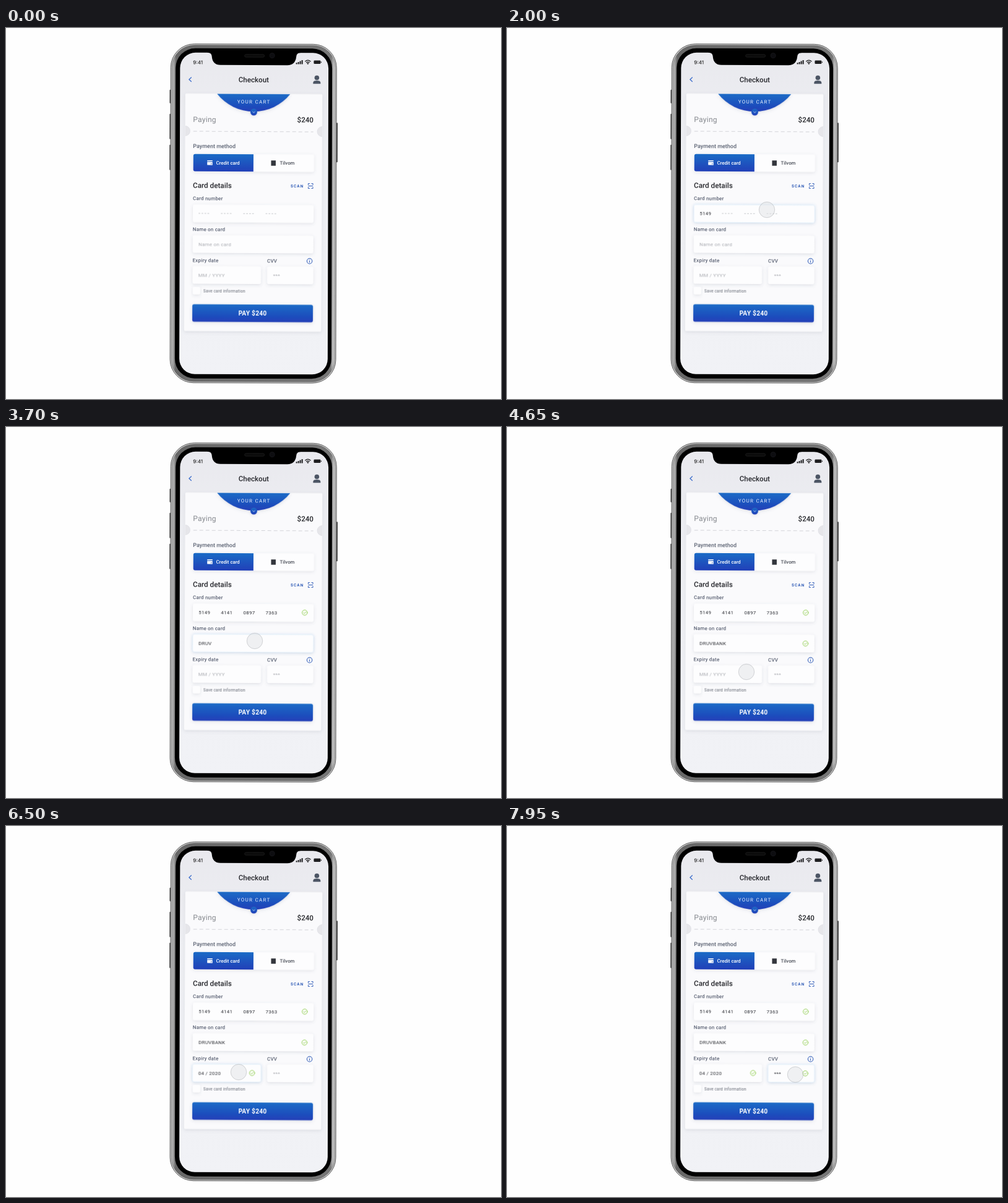
An HTML page for the animation above (8000 ms loop, 800 px wide and 600 px high).

```html
<!DOCTYPE html>
<html lang="en">
<head>
<meta charset="utf-8">
<title>Checkout</title>
<style>
  html, body { margin: 0; width: 100%; height: 100%; overflow: hidden; background: #fefefe; }
  svg { display: block; width: 800px; height: 600px; }
  text { font-family: Roboto, sans-serif; white-space: pre; }
  .label { font-size: 8px; font-weight: 500; letter-spacing: .2px; fill: #596072; }
  .value { font-size: 8px; letter-spacing: .25px; fill: #303238; }
  .hint { font-size: 8px; letter-spacing: .25px; fill: #a9abb1; }
  .tab { font-size: 7.8px; font-weight: 500; }
  .box { fill: #fdfdfe; filter: url(#soft); }
  .glow { fill: #fdfdfe; stroke: #e0eefa; stroke-width: .6; filter: url(#blueGlow); }
  .line { fill: none; stroke-width: 1; stroke-linecap: round; stroke-linejoin: round; }
  .blue { stroke: #2a57b5; }
  .ok { stroke: #94cf55; }
  .bad { stroke: #bd4a2c; }
</style>
</head>
<body>
<svg viewBox="0 0 800 600">
  <defs>
    <linearGradient id="blue" x2="0" y2="1">
      <stop stop-color="#1a6bc6"/><stop offset="1" stop-color="#213fb8"/>
    </linearGradient>
    <linearGradient id="screenFill" x2="0" y2="1">
      <stop stop-color="#e9e9ee"/><stop offset=".3" stop-color="#eeeff3"/><stop offset="1" stop-color="#f1f2f6"/>
    </linearGradient>
    <linearGradient id="metal" x2="1" y2="0">
      <stop stop-color="#bcbcbc"/><stop offset=".012" stop-color="#a2a2a2"/><stop offset=".025" stop-color="#676767"/>
      <stop offset=".975" stop-color="#777"/><stop offset=".988" stop-color="#b4b4b4"/><stop offset="1" stop-color="#cfcfcf"/>
    </linearGradient>
    <filter id="soft" x="-20%" y="-50%" width="140%" height="200%">
      <feDropShadow dx="0" dy="1.5" stdDeviation="2.5" flood-color="#5a6078" flood-opacity=".17"/>
    </filter>
    <filter id="blueGlow" x="-20%" y="-50%" width="140%" height="200%">
      <feDropShadow dx="0" dy="0" stdDeviation="2.2" flood-color="#6db8f5" flood-opacity=".25"/>
    </filter>
    <clipPath id="cardClip"><rect x="289" y="106.5" width="221.5" height="384" rx="2"/></clipPath>
    <g id="check"><circle r="4.2"/><path d="M-1.9 .1-.5 1.5 2-1.2"/></g>
  </defs>

  <g transform="rotate(.15 400 300)">
    <!-- phone -->
    <g fill="#3c3c3c">
      <rect x="264" y="100" width="3" height="22" rx="1"/>
      <rect x="264" y="139" width="3" height="41" rx="1"/>
      <rect x="264" y="189" width="3" height="41" rx="1"/>
      <rect x="533" y="153" width="2.6" height="64" rx="1"/>
    </g>
    <rect x="265.7" y="26" width="267.9" height="548" rx="38" fill="#cdcdcd" stroke="#4b4b4b" stroke-width=".9"/>
    <rect x="267.8" y="28" width="263.8" height="544" rx="36" fill="url(#metal)" stroke="#555" stroke-width=".6"/>
    <rect x="273.5" y="33" width="253" height="534" rx="32"/>
    <rect x="280.7" y="40" width="239.8" height="520" rx="25" fill="url(#screenFill)"/>
    <path d="M325 39H475V40Q469 40 468.5 46Q467 60 454 60H346Q333 60 332 46Q331.5 40 325 40Z"/>
    <rect x="385" y="42.7" width="32" height="4.5" rx="2.2" fill="#0b0b0b" stroke="#222" stroke-width=".7"/>
    <circle cx="429.5" cy="44.5" r="4" fill="#0d0d10" stroke="#1c1c20" stroke-width=".7"/>

    <!-- status bar and header -->
    <text x="301.6" y="58.8" font-size="8" font-weight="500" fill="#222" style="font-family: Inter, sans-serif">9:41</text>
    <g fill="#1d1d1f">
      <path d="M468 56h2v2.3h-2zM471 54.8h2v3.5h-2zM474 53.3h2v5h-2zM477 51.8h2v6.5h-2z"/>
      <rect x="496.8" y="52.2" width="11" height="5.6" rx="1.4"/>
      <rect x="508.4" y="54" width="1" height="2" rx=".5"/>
      <circle cx="487.2" cy="57.3" r="1.2"/>
    </g>
    <path class="line" stroke="#1d1d1f" style="stroke-width:1.3" d="M483 53.7Q487.200 50 491.400 53.700M484.800 55.700Q487.200 53.700 489.600 55.700"/>
    <path class="line" stroke="#3f70cc" style="stroke-width:1.3" d="M298.800 80.200 295.300 83.500 298.800 86.800"/>
    <text x="399.800" y="87.700" text-anchor="middle" font-size="11.600" font-weight="500" fill="#25262b">Checkout</text>
    <g fill="#4d5665">
      <circle cx="501.800" cy="80.300" r="3.800"/>
      <path d="M495.800 90V88.200Q495.800 84.800 501.800 84.800T507.800 88.200V90Z"/>
    </g>
  </g>

  <g transform="rotate(.3 400 300)">
    <!-- card -->
    <rect x="288.800" y="106.500" width="221.500" height="384" rx="2" fill="#fafafc" filter="url(#soft)"/>
    <g clip-path="url(#cardClip)">
      <path d="M340 106.500A75.500 75.500 0 0 0 458.500 106.500Z" fill="url(#blue)" filter="url(#soft)"/>
      <circle cx="288.800" cy="167" r="8" fill="#e6e6ea" stroke="#dcdde2" stroke-width=".7"/>
      <circle cx="510.300" cy="167" r="8" fill="#e6e6ea" stroke="#dcdde2" stroke-width=".7"/>
    </g>
    <circle cx="399.600" cy="136" r="5.500" fill="url(#blue)" filter="url(#soft)"/>
    <path class="line" stroke="#cfe2ff" style="stroke-width:.9" d="M397.900 135.400 399.600 137 401.300 135.400"/>
    <text x="399.700" y="122.200" text-anchor="middle" font-size="8" letter-spacing="1.300" fill="#eaf1ff">YOUR CART</text>
    <text x="301.600" y="152.500" font-size="12" letter-spacing=".25" fill="#85888e">Paying</text>
    <text x="496.200" y="152.200" text-anchor="end" font-size="11.600" font-weight="500" fill="#25262b">$240</text>
    <path d="M302 167.500H496" stroke="#d3d4d9" stroke-dasharray="6 4"/>

    <text x="301.800" y="194.500" font-size="9" font-weight="500" fill="#5b6272">Payment method</text>
    <rect class="box" x="302.300" y="204.300" width="195" height="28" rx="3"/>
    <path d="M399.500 204.300V232.300H305.300a3 3 0 0 1-3-3V207.300a3 3 0 0 1 3-3Z" fill="url(#blue)"/>
    <path d="M324.800 214.300h8.500v1.600h-8.500zM324.800 217h8.500v5h-8.500z" fill="#fff"/>
    <path d="M330.300 220.200h2" stroke="#2557bd"/>
    <text class="tab" x="339.100" y="221.200" fill="#fff">Credit card</text>
    <rect x="428" y="214" width="7.500" height="8.500" fill="#33363d"/>
    <text class="tab" x="442.200" y="220.700" fill="#494d57">Tilvom</text>

    <text x="301.900" y="259" font-size="11.700" font-weight="500" fill="#25262b">Card details</text>
    <text x="459.700" y="257.500" font-size="6.300" font-weight="700" letter-spacing="1.200" fill="#2a57b5">SCAN</text>
    <path class="line blue" d="M488.200 253V251.200H490.500M493.500 251.200H495.800V253M488.200 257V258.800H490.500M493.500 258.800H495.800V257M488.500 255H495.500"/>

    <text class="label" x="302" y="278.800">Card number</text>
    <text class="label" x="302" y="328.800">Name on card</text>
    <text class="label" x="302" y="379">Expiry date</text>
    <text class="label" x="422.400" y="379.300">CVV</text>
    <g class="line blue" transform="translate(491 376.500)"><circle r="4.200"/><path d="M0-.2V2M0-2V-1.900"/></g>

    <g id="fields"></g>

    <rect class="box" x="302.500" y="419.300" width="12" height="12" rx="2"/>
    <text x="319.600" y="428.200" font-size="6.700" letter-spacing=".12" fill="#666b76">Save card information</text>
    <rect x="301.900" y="447.200" width="195" height="28.300" rx="3" fill="url(#blue)" filter="url(#soft)"/>
    <text x="399.400" y="465" text-anchor="middle" font-size="10" font-weight="700" letter-spacing=".35" fill="#fff">PAY $240</text>
  </g>

  <circle id="touch" r="12.700" fill="#e2e3e6" fill-opacity=".5" stroke="#8f9299" stroke-opacity=".45" stroke-width=".8"/>
</svg>

<script>
const LOOP = 8000;
const fields = document.getElementById('fields');
const timing = { duration: LOOP, iterations: Infinity };

function add(parent, tag, attrs = {}, content = '') {
  const el = document.createElementNS('http://www.w3.org/2000/svg', tag);
  for (const key in attrs) el.setAttribute(key, attrs[key]);
  el.textContent = content;
  parent.append(el);
  return el;
}

// Visible from one time to another, with a short fade at each end.
function show(el, from, to = LOOP, fade = 100, prop = 'opacity') {
  const steps = from ? [[0, 0], [from, 0], [from + fade, 1]] : [[0, 1]];
  steps.push(...(to < LOOP ? [[to, 1], [to + fade, 0], [LOOP, 0]] : [[LOOP, 1]]));
  el.animate(steps.map(([t, v]) => ({ offset: t / LOOP, [prop]: v })), timing);
}

// Types text one character at a time; `lifetimes` cuts single characters short.
function type(x, y, text, start, pace, lifetimes = {}) {
  const line = add(fields, 'text', { x, y, class: 'value' });
  [...text].forEach((char, i) =>
    show(add(line, 'tspan', {}, char), start + i * pace, lifetimes[i], 0, 'fillOpacity'));
}

function field(x, y, width, focusFrom, focusTo) {
  const box = { x, y, width, height: 28.3, rx: 3 };
  add(fields, 'rect', { ...box, class: 'box' });
  show(add(fields, 'rect', { ...box, class: 'glow' }), focusFrom, focusTo);
}

function hint(x, y, text, until) {
  show(add(fields, 'text', { x, y, class: 'hint' }, text), 0, until, 0);
}

function check(x, y, from) {
  const at = { class: 'line ok', transform: `translate(${x} ${y})`, href: '#check' };
  show(add(fields, 'use', at), from);
}

field(302.1, 286.2, 195, 1750, 3150);
const groups = ['5149', '4141', '0897', '7363'];
groups.forEach((digits, i) => {
  const x = 311.2 + i * 36.1;
  const dashes = { d: `M${x} 300.2h17.5`, stroke: '#b9bbc1', 'stroke-width': .8, 'stroke-dasharray': '2.8 2' };
  show(add(fields, 'path', dashes), 0, 1850 + i * 160, 0);
  type(x, 303, digits, 1850 + i * 160, 40);
});
check(482.8, 299.8, 2520);

field(302, 335.7, 195, 3200, 4400);
hint(311.2, 352.6, 'Name on card', 3400);
type(311.2, 352.6, 'DRUVBANK', 3400, 80);
check(482.7, 349.8, 4050);

field(302, 385.7, 110.5, 4750, 6950);
hint(311.3, 402.6, 'MM / YYYY', 4880);
type(311.3, 402.6, '04 / 2024', 4880, 50, { 8: 6230 });
const fix = add(fields, 'text', { x: 311.3, y: 402.6, class: 'value' });
add(fix, 'tspan', { 'fill-opacity': 0 }, '04 / 202');
show(add(fix, 'tspan', {}, '0'), 6340, LOOP, 0, 'fillOpacity');
const warning = { x: 360.2, y: 378.9, 'font-size': 7.8, 'font-weight': 500, 'letter-spacing': .25, fill: '#b3432a' };
show(add(fields, 'text', warning, 'Incorrect date'), 5350, 6200);
const cross = add(fields, 'g', { class: 'line bad', transform: 'translate(398 399.5)' });
add(cross, 'circle', { r: 4.2 });
add(cross, 'path', { d: 'M-1.4-1.4 1.4 1.4M1.4-1.4-1.4 1.4' });
show(cross, 5350, 6200);
check(398.2, 399.5, 6370);

field(422.6, 385.7, 74.5, 7150);
hint(432.3, 403.2, '***', 7350);
type(432.3, 403.2, '***', 7350, 110);
check(482.7, 399.7, 7650);

// time, x, y, easing towards the next stop
const path = [
  [0, 572, -28], [850, 572, -28, 'linear'], [1150, 489, 107, 'ease-out'],
  [1600, 420, 294], [2800, 420, 294], [3200, 402, 346],
  [4280, 402, 346], [4640, 387, 396], [5420, 387, 396],
  [5800, 382, 450], [5900, 382, 450], [6200, 376, 398],
  [6720, 376, 398], [7100, 466, 402], [LOOP, 466, 402]
];
document.getElementById('touch').animate(path.map(([t, x, y, easing = 'ease-in-out']) => ({
  offset: t / LOOP, easing, transform: `translate(${x}px, ${y}px)`
})), timing);
</script>
</body>
</html>
```
